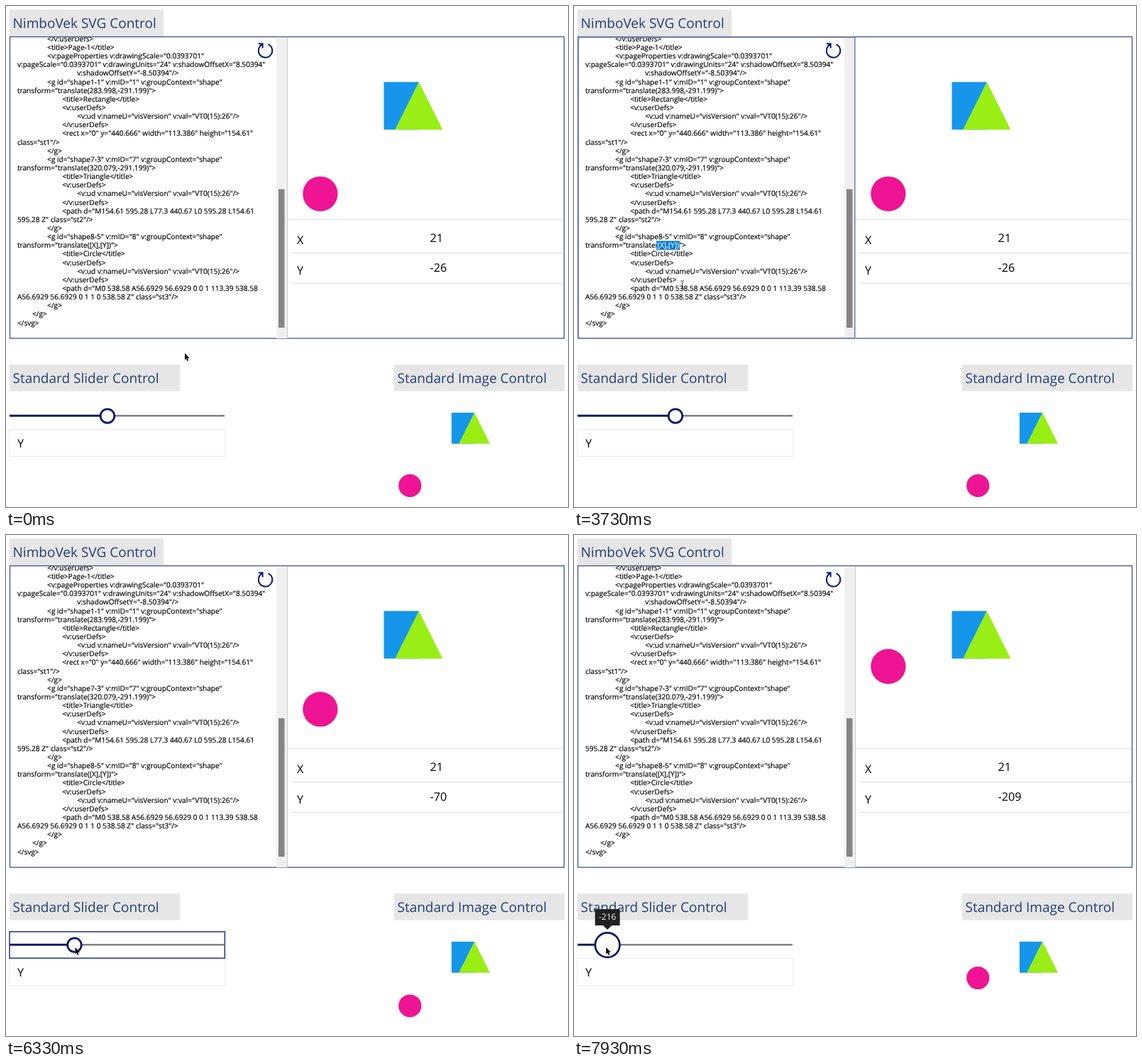
An HTML page that plays this animation: 792x707 px, repeating every 8 s.

```html
<!DOCTYPE html>
<html lang="en">
<head>
<meta charset="utf-8">
<title>SVG control demo</title>
<style>
  html, body { margin: 0; width: 100%; height: 100%; overflow: hidden; background: #fff; }
  svg { display: block; }
  text { font-family: "Open Sans", "Noto Sans", sans-serif; font-size: 16.2px; text-rendering: geometricPrecision; white-space: pre; }
  .head rect { fill: #e6e6e6; }
  .head text { font-size: 19px; fill: #203f7c; }
  .code { color: #000; }
  .code text { font-size: 10.14px; fill: currentColor; stroke: currentColor; stroke-width: .18px; }
  .rule { stroke: #d9d9d9; }
  .blue { fill: #1596eb; }
  .green { fill: #99ee14; }
  .pink { fill: #ee1494; }
</style>
</head>
<body>
<svg width="792" height="707" viewBox="0 0 792 707">
  <defs>
    <clipPath id="pane"><rect x="6" y="44" width="375" height="425"/></clipPath>
    <clipPath id="selClip"><rect class="sel" x="115.8" y="331.5" height="12.5"/></clipPath>
    <g id="fixed">
      <rect class="blue" x="283.998" y="149.467" width="113.386" height="154.61"/>
      <path class="green" d="M474.69 304.08 397.38 149.47 320.08 304.08Z"/>
    </g>
  </defs>

  <g class="head">
    <rect x="5" y="5" width="217" height="38"/><text x="9.5" y="31">NimboVek SVG Control</text>
    <rect x="5" y="506" width="240" height="37.5"/><text x="9.5" y="532">Standard Slider Control</text>
    <rect x="547" y="506" width="240" height="37.5"/><text x="551.5" y="532">Standard Image Control</text>
  </g>

  <rect x="5.5" y="43.5" width="781" height="425.5" fill="#fff" stroke="#2c4a8c" stroke-width="1.2"/>
  <g class="code" id="code" clip-path="url(#pane)"></g>
  <rect class="sel" x="115.8" y="331.5" height="12.5" fill="#0078d7"/>
  <g class="code" id="picked" clip-path="url(#selClip)" style="color:#fff"></g>

  <rect x="381" y="44" width="15" height="425" fill="#f0f0f0"/>
  <rect x="384" y="258.5" width="8.5" height="195.5" fill="#858585"/>
  <path d="M396.5 44V469" stroke="#cdcdcd"/>
  <rect id="focus" x="6.2" y="44.2" width="389.4" height="424.4" fill="none" stroke="#7488c4" stroke-width="1.4"/>
  <path d="M369.5 54.1A9.7 9.7 0 1 1 361 54.4M355.8 53.2H361.6V59.4" fill="none" stroke="#00176d" stroke-width="2"/>

  <path class="rule" d="M397 301.3H786M402 348.7H786M402 391.3H786"/>
  <text x="410" y="336">X</text><text x="597.5" y="332.5">21</text>
  <text x="410" y="379">Y</text><text id="yVal" x="597.5" y="375"></text>

  <g class="art" transform="translate(409.1 42.3) scale(.4345)">
    <use href="#fixed"/><circle class="pink ball" cx="77.7" r="56.69"/>
  </g>
  <g class="art" transform="translate(547.2 531.4) scale(.284)">
    <use href="#fixed"/><circle class="pink ball" cx="77.7" r="56.69"/>
  </g>

  <rect x="4.5" y="597.5" width="304" height="38" fill="none" stroke="#ebebeb"/>
  <text x="16" y="623">Y</text>
  <rect id="ring" x="5" y="559.8" width="303.3" height="37.4" fill="none" stroke="#34459a" stroke-width="1.7"/>
  <path id="rest" d="M5 578.2H308" stroke-width="2.5"/>
  <path id="done" stroke-width="2.7"/>
  <circle id="knob" cy="578.6" fill="#fff" stroke-width="2.7"/>
  <g id="tip">
    <path d="M-17.5 528H17.5V551H6L0 557 -6 551H-17.5Z" fill="#212121"/>
    <text id="tipVal" y="543.3" text-anchor="middle" style="font-size:12px" fill="#f2f2f2"></text>
  </g>

  <path id="arrow" d="M0 0V9.6L2.1 7.7 3.5 10.9 5.1 10.2 3.7 7.1H6.7Z" stroke="#fff" stroke-width=".8" paint-order="stroke"/>
  <path id="beam" d="M-2.3 -5.3H-.6L0 -4.7 .6 -5.3H2.3M0 -4.7V4.7M-2.3 5.3H-.6L0 4.7 .6 5.3H2.3" fill="none" stroke="#222" stroke-width=".9"/>
</svg>

<script>
const $ = id => document.getElementById(id);
const all = sel => document.querySelectorAll(sel);
const show = (el, on) => { el.style.display = on ? '' : 'none'; };
const at = (el, x, y) => el.setAttribute('transform', `translate(${x} ${y})`);
const ramp = (n, a, b) => Math.min(1, Math.max(0, (n - a) / (b - a)));
const smooth = t => t * t * (3 - 2 * t);

// Code listing: [tabs, text]
const defs = [[3, '<v:userDefs>'], [4, '<v:ud v:nameU="visVersion" v:val="VT0(15):26"/>'], [3, '</v:userDefs>']];
const shape = (id, n, move, name, body) => [
  [2, `<g id="shape${id}" v:mID="${n}" v:groupContext="shape"`],
  [0, `transform="translate(${move})">`],
  [3, `<title>${name}</title>`], ...defs,
  [3, body[0]], [0, body[1]], [2, '</g>']
];
const lines = [
  [2, '</v:userDefs>'],
  [2, '<title>Page-1</title>'],
  [2, '<v:pageProperties v:drawingScale="0.0393701"'],
  [0, 'v:pageScale="0.0393701" v:drawingUnits="24" v:shadowOffsetX="8.50394"'],
  [4, 'v:shadowOffsetY="-8.50394"/>'],
  ...shape('1-1', 1, '283.998,-291.199', 'Rectangle',
    ['<rect x="0" y="440.666" width="113.386" height="154.61"', 'class="st1"/>']),
  ...shape('7-3', 7, '320.079,-291.199', 'Triangle',
    ['<path d="M154.61 595.28 L77.3 440.67 L0 595.28 L154.61', '595.28 Z" class="st2"/>']),
  ...shape('8-5', 8, '[X],[Y]', 'Circle',
    ['<path d="M0 538.58 A56.6929 56.6929 0 0 1 113.39 538.58', 'A56.6929 56.6929 0 1 1 0 538.58 Z" class="st3"/>']),
  [1, '</g>'],
  [0, '</svg>']
];
lines.forEach(([tabs, str], i) => {
  const row = document.createElementNS('http://www.w3.org/2000/svg', 'text');
  row.setAttribute('x', 15.9 + tabs * 21.1);
  row.setAttribute('y', 49.9 + i * 12.14);
  row.textContent = str;
  $('code').append(row);
  if (str.includes('[X]')) $('picked').append(row.cloneNode(true));
});

// Time is counted in steps of 1/15 s
const STEP = 1000 / 15, STEPS = 120, GRAB = 77;

// Pointer legs before the slider is grabbed: start, end, x, y, sideways bend
const legs = [
  [0, 13, 79, 341.5, 0], [13, 19, 74.5, 339.5, 4], [31, 32, 118, 339, 0],
  [32, 44, 148, 337, 0], [52, 65, 145, 586, 6.5], [65, 68, 142, 584, 0]
];
function pointer(n) {
  let x = 252, y = 490;
  for (const [a, b, toX, toY, bend] of legs) {
    const t = ramp(n, a, b), e = smooth(t);
    x += (toX - x) * e + bend * Math.sin(Math.PI * t);
    y += (toY - y) * e;
  }
  return [x, y];
}

// Slider drags: press, release, value reached.
// One step after release the drawing reloads, until the next press.
const drags = [[GRAB, 84, -70], [88, 95, -118], [99, 104, -160], [108, 114, -209], [117, STEPS, -219]];
function slide(n) {
  const s = { value: n < GRAB ? -26 : -24, Y: -26, held: false, loading: false };
  for (const [press, release, to] of drags) {
    if (n < press) break;
    s.value += (to - s.value) * ramp(n, press, release);
    s.held = n < release;
    s.loading = n > release;
    if (s.loading) s.Y = to;
  }
  return s;
}

function draw(n) {
  const { value, Y, held, loading } = slide(n);
  const k = 156.1 + value * .5053;
  const [x, y] = n < GRAB ? pointer(n) : [held ? k - 1.9 : k + 1, 582];
  const typing = y < 469;
  show($('beam'), typing);
  show($('arrow'), !typing);
  at($(typing ? 'beam' : 'arrow'), x, y);

  // Editor focus and selection
  $('focus').style.opacity = n < GRAB ? ramp(n, 23, 28) - .5 * ramp(n, 60, 64) : 0;
  const end = n > 32 && n < GRAB ? Math.min(n < 45 ? x : 148, 148) + .9 : 115.8;
  all('.sel').forEach(r => r.setAttribute('width', end - 115.8));

  // Slider
  const hover = n > 66 && n <= GRAB;
  const navy = hover ? '#203083' : '#00126b';
  $('rest').setAttribute('stroke', hover ? '#949494' : '#808080');
  $('done').setAttribute('stroke', navy);
  $('done').setAttribute('d', `M5 578.2H${k}`);
  $('knob').setAttribute('stroke', navy);
  $('knob').setAttribute('cx', k);
  $('knob').setAttribute('r', held ? 17.3 : 9.8);
  show($('ring'), n > GRAB && !held);
  show($('tip'), held);
  at($('tip'), k, 0);
  $('tipVal').textContent = Math.round(value);

  // Drawing follows the last committed value
  $('yVal').textContent = Y;
  all('.ball').forEach(c => c.setAttribute('cy', 538.58 + Y));
  all('.art').forEach(g => show(g, !loading));
}

function tick() {
  draw(Math.floor((performance.now() + 5) / STEP) % STEPS);
  requestAnimationFrame(tick);
}
tick();
</script>
</body>
</html>
```
